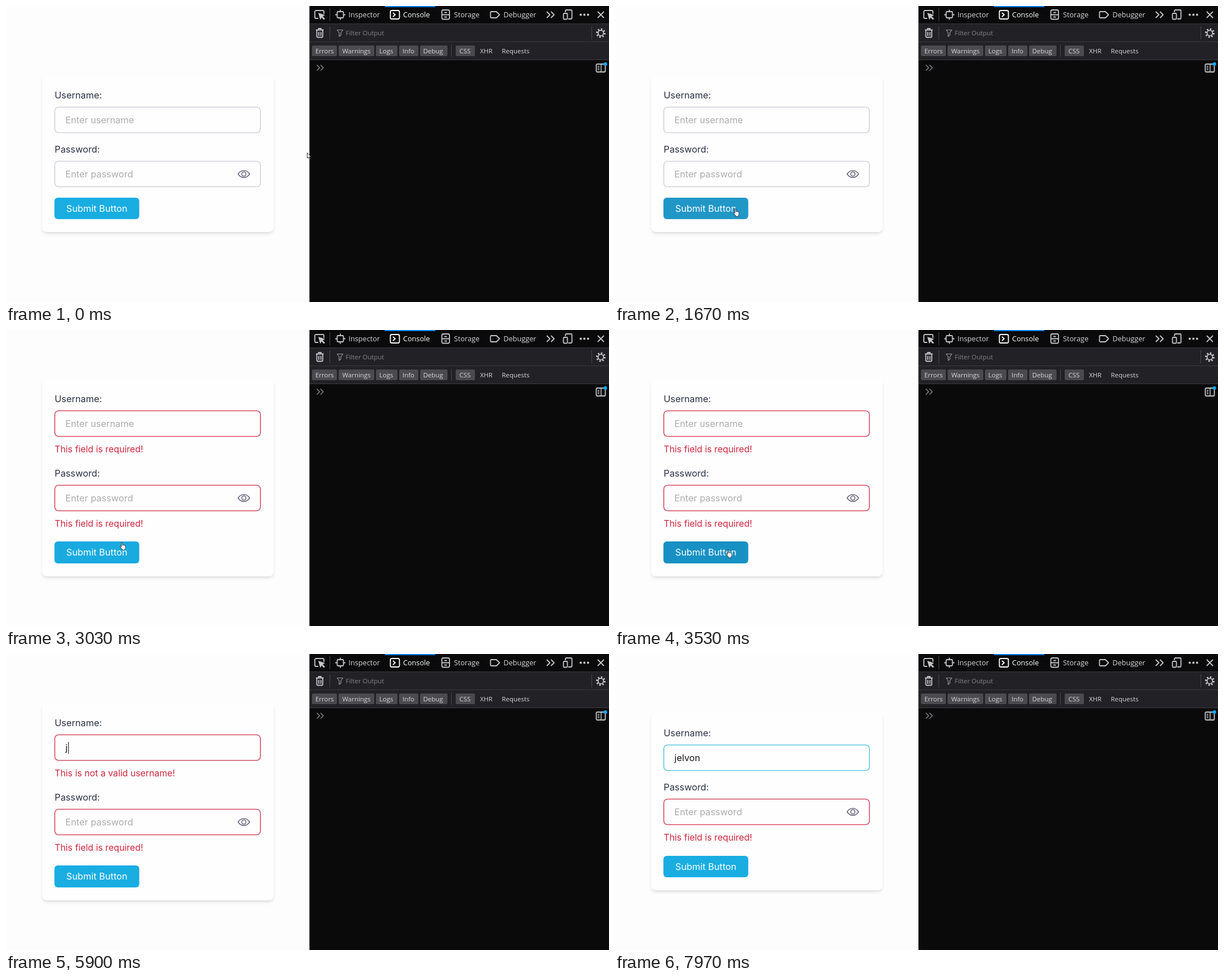
Recreate the animation shown at these times as an HTML page. Size 1066x525 px, loop 8000 ms.

```html
<!DOCTYPE html>
<html lang="en">
<head>
<meta charset="utf-8">
<title>Form validation</title>
<style>
@property --a { syntax: "<number>"; inherits: true; initial-value: 0; }
@property --b { syntax: "<number>"; inherits: true; initial-value: 0; }

html, body { margin: 0; width: 100%; height: 100%; overflow: hidden; background: #fdfdfd; }

/* --a and --b: how far the username and password messages are open */
#stage {
  position: absolute; inset: 0; overflow: hidden;
  font: 16.25px/24px Inter, "Open Sans", sans-serif; color: #2a3042;
  --half: 17.9px;
  --up: calc(-1 * var(--half) * (var(--a) + var(--b)));
  animation: open-a 8s ease-in-out infinite, open-b 8s ease-in-out infinite;
}
#stage div, .tools { position: absolute; white-space: pre; box-sizing: border-box; }

.card {
  left: 64px; top: calc(123px + var(--up)); width: 409px;
  height: calc(278px - 2 * var(--up)); border-radius: 8px; background: #fefefe;
  box-shadow: 0 4px 6px -1px rgba(0,0,0,.1), 0 2px 4px -2px rgba(0,0,0,.1);
}
.row { left: 86px; width: 364px; }
.user { top: calc(145.8px + var(--up)); --p: var(--a); }
.pass { top: calc(242.3px + var(--up) + 2 * var(--half) * var(--a)); --p: var(--b); }
.box {
  left: 0; top: 33px; width: 364px; height: 46px; border: 1px solid; border-radius: 7px;
  box-shadow: 0 0 0 .35px; padding-left: 18px; line-height: 44px; background: #fefefe;
}
.user .box { animation: user-edge 8s linear infinite; }
.pass .box { animation: pass-edge 8s linear infinite; }
.hint { color: #acacb0; }
.user .hint { position: absolute; left: 18px; animation: until-typed 8s step-end infinite; }
.typed { color: #17181c; }
.caret {
  display: inline-block; width: 1px; height: 21px; margin-left: 1px; vertical-align: -5px;
  background: #111; animation: blink 8s step-end infinite;
}
.error {
  left: 0; top: calc(72.2px + var(--half) * var(--p)); font-size: 15.8px; color: #d0253d;
  animation: pass-error 8s linear infinite;
}
.user .error { animation-name: user-error; }
.required { animation: until-typed 8s step-end infinite; }
.invalid { position: absolute; left: 0; animation: once-typed 8s step-end infinite; }
.eye { position: absolute; left: 322px; top: 12px; }
.button {
  left: 86px; top: calc(339.6px - var(--up)); width: 150px; height: 38.5px; border-radius: 6px;
  line-height: 38px; text-align: center; color: #fff; background: #19ade2;
  transform: translateX(-.4px); animation: hover 8s linear infinite;
}

.tools { left: 536px; top: 0; }
.tools text { font: 11.45px "Open Sans", "Noto Sans", sans-serif; fill: #d7d7db; }
.tools .tab { font-size: 12.65px; }
.line { fill: none; stroke: #c4c4c8; stroke-width: 1.8; stroke-linejoin: round; }

#cursor { left: 0; top: 0; animation: move 8s ease-in-out infinite; }
#cursor svg { position: absolute; left: -10px; top: -10px; }
.arrow { animation: arrow 8s step-end infinite; }
.beam { animation: beam 8s step-end infinite; }
.hand { animation: hand 8s step-end infinite; }

@keyframes open-a { 0%, 26.4% { --a: 0 } 30.4%, 85.5% { --a: 1 } 89.5%, 100% { --a: 0 } }
@keyframes open-b { 0%, 26.4% { --b: 0 } 30.4%, 100% { --b: 1 } }
@keyframes user-error { 0%, 27.4% { opacity: 0 } 30.4%, 85.5% { opacity: 1 } 88%, 100% { opacity: 0 } }
@keyframes pass-error { 0%, 27.4% { opacity: 0 } 30.4%, 100% { opacity: 1 } }
@keyframes user-edge {
  0%, 26.4% { color: #cacad6 }
  27.6%, 85.5% { color: #cf3049 }
  87.5%, 100% { color: #43c0d9 }
}
@keyframes pass-edge { 0%, 26.4% { color: #cacad6 } 27.6%, 100% { color: #cf3049 } }
@keyframes until-typed { 0% { visibility: visible } 73.25%, 100% { visibility: hidden } }
@keyframes once-typed { 0% { visibility: hidden } 73.25%, 100% { visibility: visible } }
@keyframes blink {
  0% { opacity: 0 } 65.6% { opacity: 1 } 71.8% { opacity: 0 }
  73.25% { opacity: 1 } 98.7%, 100% { opacity: 0 }
}
@keyframes hover {
  0%, 17.8% { background: #19ade2 }
  20.5% { background: #2097c7 }
  28%, 29.5% { background: #1791c3 }
  33%, 37.7% { background: #19ade2 }
  41%, 52.8% { background: #1791c3 }
  56.5%, 100% { background: #19ade2 }
}
@keyframes move {
  0%, 5% { transform: translate(532px, 260px) }
  20.8% { transform: translate(213px, 359px) }
  28%, 32.5% { transform: translate(212px, 361px) }
  37.9% { transform: translate(205px, 376px) }
  45%, 50% { transform: translate(200px, 390px) }
  54.6%, 57% { transform: translate(261px, 364px) }
  64.5%, 100% { transform: translate(215px, 168px) }
}
@keyframes arrow {
  0% { opacity: 1 } 10.5% { opacity: 0 } 14% { opacity: 1 } 17.8% { opacity: 0 }
  29.5% { opacity: 1 } 37.6% { opacity: 0 } 52.6% { opacity: 1 } 59.4% { opacity: 0 }
  60.5% { opacity: 1 } 62.9%, 100% { opacity: 0 }
}
@keyframes beam {
  0% { opacity: 0 } 10.5% { opacity: 1 } 14% { opacity: 0 } 59.4% { opacity: 1 }
  60.5% { opacity: 0 } 62.9% { opacity: 1 } 73.25%, 100% { opacity: 0 }
}
@keyframes hand {
  0% { opacity: 0 } 17.8% { opacity: 1 } 29.5% { opacity: 0 } 37.6% { opacity: 1 } 52.6%, 100% { opacity: 0 }
}
</style>
</head>
<body>
<div id="stage">
  <div class="card"></div>

  <div class="row user">Username:<div class="box"><span class="hint">Enter username</span><span class="typed" id="typed"></span><span class="caret"></span></div><div class="error"><span class="required">This field is required!</span><span class="invalid">This is not a valid username!</span></div></div>

  <div class="row pass">Password:<div class="box"><span class="hint">Enter password</span><svg class="eye" width="24" height="20" fill="none" stroke="#62627a" stroke-width="1.5"><path d="M1.3 10Q5.5 3.7 11.5 3.7T21.7 10Q17.5 16.3 11.5 16.3T1.3 10Z"/><circle cx="11.5" cy="10" r="3.7"/></svg></div><div class="error">This field is required!</div></div>

  <div class="button">Submit Button</div>

  <svg class="tools" width="530" height="525" viewBox="536 0 530 525">
    <path fill="#0a0a0b" d="M536 0h530v525H536z"/>
    <path fill="#212126" d="M536 31h530v65H536z"/>
    <path stroke="#3a3a40" d="M536 31.5h530M536 63.5h530M536 95.5h530"/>
    <path stroke="#6e6e72" d="M536.5 0v525"/>
    <path stroke="#48484e" d="M572.5 4v23M572.5 36v23M1035.5 36v23M787.5 69v21"/>
    <path fill="#0a84ff" d="M670 0h89v2h-89z"/>

    <g class="line">
      <path d="M552 22h-4a2 2 0 0 1-2-2V10a2 2 0 0 1 2-2h12a2 2 0 0 1 2 2v4"/>
      <path fill="#c4c4c8" stroke="none" d="M552 12l12 4-4 2.5 4 4-2 2-4-4-2.5 4z"/>
      <rect x="585.5" y="10" width="11" height="11" rx="1.5"/>
      <path d="M591 6.5V10M591 21v3.5M582 15.5h3.5M596.5 15.5h3.5"/>
      <g stroke="#fff"><rect x="679.5" y="8" width="16" height="15" rx="2.5"/><path d="M684 12l4 3.5-4 3.5"/></g>
      <rect x="770.5" y="7" width="13.5" height="16.5" rx="2.5"/>
      <path d="M771 15.5h13M775 11.5h4.5M775 19.5h4.5"/>
      <path d="M858 10h9l5.5 5.5-5.5 5.5h-9q-1.5 0-1.5-1.5v-8q0-1.5 1.5-1.5z"/>
      <path d="M956 10l5.5 5.5-5.5 5.5M963.5 10l5.5 5.5-5.5 5.5"/>
      <path d="M989 11V8.5q0-1.5 1.5-1.5h8.5q1.5 0 1.5 1.5v13q0 1.5-1.5 1.5h-5"/>
      <rect x="985.5" y="13" width="7" height="10.5" rx="1.5"/>
      <path d="M1046 10l11 11M1057 10l-11 11"/>
      <path d="M548 42.5h13.5M552.5 42v-2h4.5v2M549.5 43v11q0 1.5 1.5 1.5h7.5q1.5 0 1.5-1.5V43M553 46v7M556.7 46v7"/>
      <path stroke="#98989c" stroke-width="1.2" d="M585.5 42.5h10l-3.5 5v4l-3 2.5v-6.5z"/>
      <circle cx="1051.5" cy="48" r="4.8"/>
      <circle cx="1051.5" cy="48" r="7" stroke-width="3" stroke-dasharray="2.5 2.998"/>
      <path stroke="#85858a" stroke-width="1.5" d="M549.5 104.5l5 5-5 5M556 104.5l5 5-5 5"/>
      <rect x="1043.5" y="103" width="16" height="14" rx="2"/>
      <path stroke-width="1.5" d="M1052 103v14M1046 107h3M1046 110h3M1046 113h3"/>
    </g>
    <g fill="#c4c4c8"><circle cx="1016" cy="15.5" r="2"/><circle cx="1022.5" cy="15.5" r="2"/><circle cx="1029" cy="15.5" r="2"/></g>
    <circle cx="1059.5" cy="103" r="3.2" fill="#0aa5f0"/>

    <g fill="#4a4a4f">
      <rect x="541" y="70" width="44" height="19" rx="2"/><rect x="588" y="70" width="63" height="19" rx="2"/>
      <rect x="654" y="70" width="38" height="19" rx="2"/><rect x="695" y="70" width="34" height="19" rx="2"/>
      <rect x="732" y="70" width="48.5" height="19" rx="2"/><rect x="795" y="70" width="34" height="19" rx="2"/>
    </g>
    <text class="tab" x="605.5" y="20">Inspector</text>
    <text class="tab" x="702" y="20" style="fill:#fff">Console</text>
    <text class="tab" x="792" y="20">Storage</text>
    <text class="tab" x="879.5" y="20">Debugger</text>
    <text x="600.5" y="52" style="fill:#85858b">Filter Output</text>
    <text x="547" y="84">Errors</text>
    <text x="594.5" y="84">Warnings</text>
    <text x="660" y="84">Logs</text>
    <text x="701" y="84">Info</text>
    <text x="737.5" y="84">Debug</text>
    <text x="801.5" y="84">CSS</text>
    <text x="838" y="84">XHR</text>
    <text x="876.5" y="84">Requests</text>
  </svg>

  <div id="cursor">
    <svg class="arrow" width="32" height="32" viewBox="-10 -10 32 32"><path d="M.5 .5v9.5l2.2-2 1.6 3.3 1.4-.7-1.5-3.1h3z" fill="#fff" stroke="#222" stroke-width=".9"/></svg>
    <svg class="beam" width="32" height="32" viewBox="-10 -10 32 32"><path d="M-2.5-6.5h2l.5.5.5-.5h2M0-6V6M-2.5 6.5h2l.5-.5.5.5h2" fill="none" stroke="#222"/></svg>
    <svg class="hand" width="32" height="32" viewBox="-10 -10 32 32"><path d="M-1 1q1-1.5 2 0v4.5q1-1 2 .2 1-.7 1.8.3 1.4-.4 1.4 1.2v3q0 1.3-1 2.3v1.7h-5v-1.5l-3.5-4.2q-.7-1.5.8-1.3l1.5 1.3z" fill="#fff" stroke="#222" stroke-width=".9" stroke-linejoin="round"/></svg>
  </div>
</div>

<script>
const name = "jelvon";
const keyTimes = [5860, 6260, 6560, 6840, 7110, 7400];
const typed = document.getElementById("typed");
let start;

function tick(now) {
  start ??= now;
  const t = (now - start) % 8000;
  const text = name.slice(0, keyTimes.filter(k => t >= k).length);
  if (typed.textContent !== text) typed.textContent = text;
  requestAnimationFrame(tick);
}
requestAnimationFrame(tick);
</script>
</body>
</html>
```
